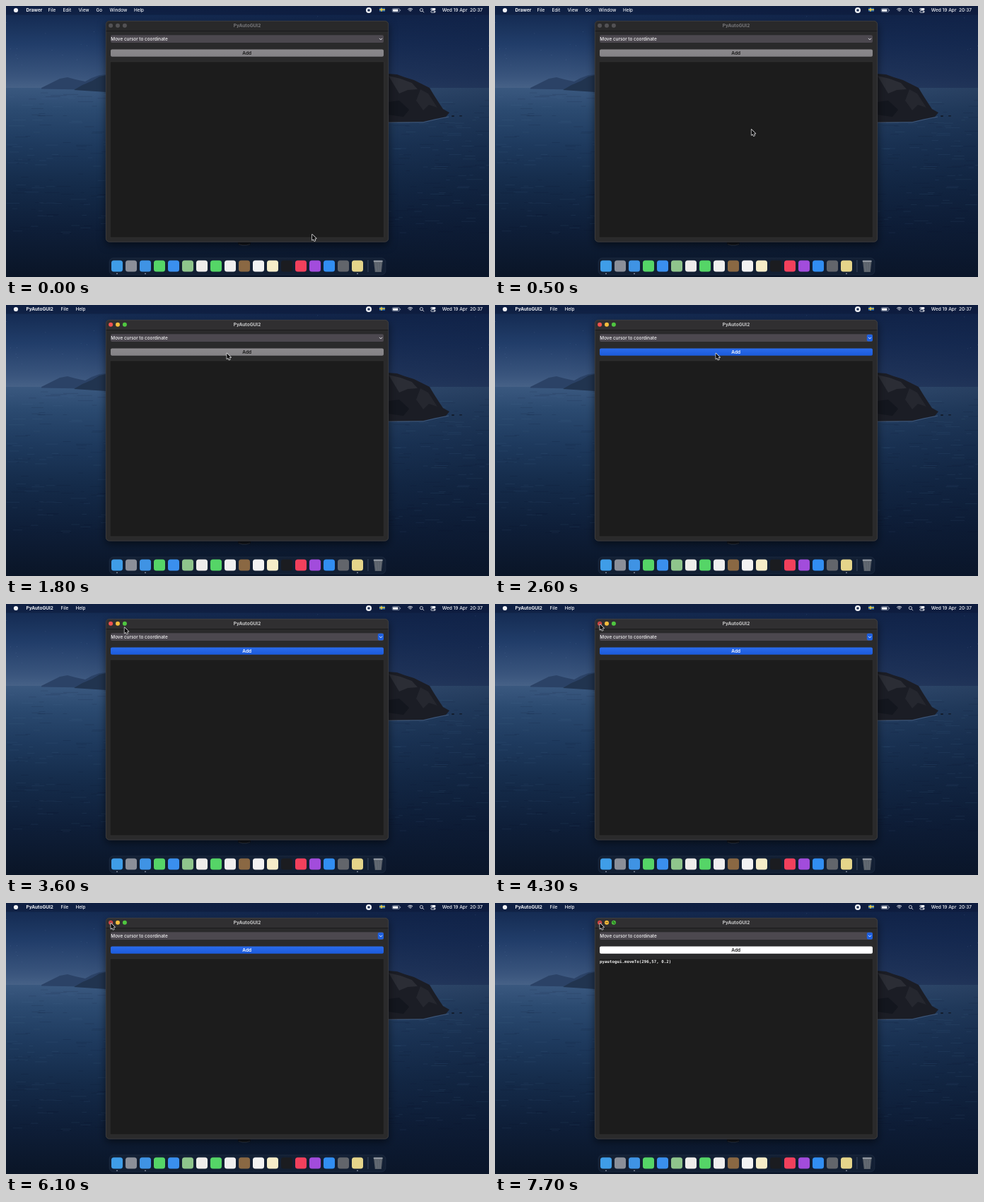
An HTML page with a canvas that plays this animation: 683x384 px, repeating every 8000 ms.

```html
<!DOCTYPE html>
<html lang="en">
<head>
<meta charset="utf-8">
<title>Desktop automation demo</title>
<style>
html, body { margin: 0; width: 100%; height: 100%; overflow: hidden; background: #0a1426; }
canvas { display: block; width: 683px; height: 384px; }
</style>
</head>
<body>
<canvas id="stage"></canvas>
<script>
const W = 683, H = 384, LOOP = 8000, STEP = 100;
const SANS = 'Inter, "Open Sans", sans-serif';
const MONO = '"DejaVu Sans Mono", "Liberation Mono", monospace';
const canvas = document.getElementById('stage');
const scale = window.devicePixelRatio || 1;
canvas.width = Math.round(W * scale);
canvas.height = Math.round(H * scale);
const screen2d = canvas.getContext('2d');
let ctx = screen2d;

function rect(x, y, w, h, fill, r = 0) {
  ctx.fillStyle = fill;
  ctx.beginPath();
  ctx.roundRect(x, y, w, h, r);
  ctx.fill();
}
function disc(x, y, r, fill) {
  ctx.fillStyle = fill;
  ctx.beginPath();
  ctx.arc(x, y, r, 0, Math.PI * 2);
  ctx.fill();
}
function trace(points, closed) {
  ctx.beginPath();
  points.forEach(([x, y]) => ctx.lineTo(x, y));
  if (closed) ctx.closePath();
}
function poly(points, fill) {
  trace(points, true);
  ctx.fillStyle = fill;
  ctx.fill();
}
function line(points, color, width = 0.8) {
  trace(points);
  ctx.strokeStyle = color;
  ctx.lineWidth = width;
  ctx.stroke();
}
function text(str, x, y, color, { size = 6.3, weight = 500, align = 'left', family = SANS } = {}) {
  ctx.font = `${weight} ${size}px ${family}`;
  ctx.textAlign = align;
  ctx.fillStyle = color;
  ctx.fillText(str, x, y);
}
function gradient(x0, y0, x1, y1, ...stops) {
  const g = ctx.createLinearGradient(x0, y0, x1, y1);
  stops.forEach(([at, color]) => g.addColorStop(at, color));
  return g;
}
const vertical = (y0, y1, ...stops) => gradient(0, y0, 0, y1, ...stops);
const horizontal = (x0, x1, ...stops) => gradient(x0, 0, x1, 0, ...stops);

function random(seed) {
  return () => (seed = (seed * 16807) % 2147483647) / 2147483647;
}

function drawWallpaper() {
  const rnd = random(77);
  rect(0, 0, W, 118, vertical(0, 118, [0, '#11264c'], [0.45, '#213d69'], [0.85, '#3a557d'], [1, '#486388']));
  rect(0, 0, W, 118, horizontal(100, W, [0, 'rgba(14,30,66,0)'], [0.75, 'rgba(14,30,66,.62)'], [1, 'rgba(14,30,66,.68)']));
  rect(0, 116, W, H - 116, vertical(116, H,
    [0, '#3a587f'], [0.12, '#2b4a70'], [0.3, '#1e3a5e'], [0.5, '#152c4b'], [0.75, '#0e1e38'], [1, '#0a1527']));
  rect(0, 116, W, H - 116, horizontal(200, W, [0, 'rgba(10,22,46,0)'], [0.8, 'rgba(10,22,46,.28)'], [1, 'rgba(10,22,46,.36)']));
  for (let i = 0; i < 35; i++) rect(rnd() * W, 14 + rnd() * 70, 0.7, 0.7, 'rgba(170,190,225,.28)');
  for (let i = 0; i < 600; i++) {
    const y = 122 + rnd() * 200;
    const tone = rnd() < 0.5 ? '90,125,165' : '5,14,32';
    rect(rnd() * W, y, 5 + rnd() * 18, 0.9, `rgba(${tone},.13)`);
  }
  poly([[50, 116], [64, 109], [76, 103], [87, 101], [98, 104], [112, 107], [121, 102], [132, 98],
    [142, 97], [142, 119], [50, 117.5]], '#2b4266');
  poly([[96, 119], [108, 112], [122, 106], [132, 100], [142, 98], [142, 122]], '#21344f');
  poly([[540, 96], [553, 97], [564, 101], [577, 105], [587, 110], [599, 116], [605, 126], [612, 137],
    [618, 146], [627, 151], [622, 157], [607, 160], [590, 164], [540, 165]], '#1b1d25');
  poly([[541, 99], [558, 103], [574, 109], [582, 118], [568, 119], [556, 124]], '#2b2d35');
  poly([[586, 118], [597, 124], [610, 144], [598, 140], [590, 148], [580, 134]], '#25272f');
  poly([[541, 136], [556, 134], [570, 147], [562, 157], [541, 154]], '#13161e');
  rect(630, 155, 4, 2, '#131c2c', 1);
  rect(641, 155, 4, 1.6, '#131c2c', 0.8);
  line([[541, 165], [590, 164.8], [607, 160.8], [626, 157]], 'rgba(130,150,180,.45)');
}

const DOCK_COLORS = ['#3f9de8', '#8b8f99', '#3f93e4', '#55d567', '#3a8fee', '#8fc58c', '#eeecea',
  '#55d567', '#f0efef', '#8a6843', '#f2f2f2', '#f5ecc8', '#1b1c20', '#f2405c', '#a24cdc',
  '#318ef2', '#62656b', '#e5d58a'];

function drawDock() {
  rect(146, 357, 391, 24, 'rgba(20,33,54,.85)', 6);
  ctx.strokeStyle = 'rgba(120,140,175,.22)';
  ctx.lineWidth = 0.5;
  ctx.stroke();
  DOCK_COLORS.forEach((color, i) => rect(149 + i * 20, 360.5, 16, 16, color, 3.5));
  [157, 197, 497].forEach(x => disc(x, 379.3, 0.8, '#c4cbd8'));
  rect(511.6, 360, 0.7, 17, 'rgba(150,165,190,.45)');
  poly([[520, 362], [532.5, 362], [530.8, 377], [521.8, 377]], '#596069');
  [523, 526.2, 529.4].forEach(x => line([[x, 364], [526.2 + (x - 526.2) * 0.8, 376]], '#767d86', 0.7));
  rect(519.6, 360.5, 13.2, 2.2, '#969ca4', 1.1);
}

function drawStatusIcons() {
  disc(513, 6, 4, '#f2f4f8');
  rect(511.4, 4.4, 3.2, 3.2, '#17294d', 0.6);
  rect(528, 2.8, 8, 5, '#2a67a5');
  rect(530.3, 2.8, 1.4, 5, '#f4cf3e');
  rect(528, 4.6, 8, 1.4, '#f4cf3e');
  ctx.strokeStyle = '#a9b3c6';
  ctx.lineWidth = 0.6;
  ctx.beginPath();
  ctx.roundRect(546.2, 3.6, 10.4, 5, 1.4);
  ctx.stroke();
  rect(547, 4.4, 7.5, 3.4, '#f2f4f8', 0.7);
  rect(557.3, 5.2, 0.8, 1.8, '#a9b3c6');
  ctx.strokeStyle = '#f2f4f8';
  ctx.lineWidth = 1;
  [1.2, 3, 4.8].forEach(r => {
    ctx.beginPath();
    ctx.arc(571.7, 8.2, r, -Math.PI * 0.76, -Math.PI * 0.24);
    ctx.stroke();
  });
  ctx.lineWidth = 0.8;
  ctx.beginPath();
  ctx.arc(587.4, 5.6, 2.1, 0, Math.PI * 2);
  ctx.stroke();
  line([[589, 7.2], [591, 9.2]], '#f2f4f8', 0.9);
  rect(600.5, 3, 7, 2.9, '#f2f4f8', 1.4);
  ctx.strokeStyle = '#f2f4f8';
  ctx.lineWidth = 0.7;
  ctx.beginPath();
  ctx.roundRect(600.8, 6.8, 6.4, 2.5, 1.2);
  ctx.stroke();
  disc(602, 4.45, 0.8, '#17294d');
  disc(606, 8.05, 0.9, '#f2f4f8');
}

function drawMenuBar(active) {
  rect(0, 0, W, 12.5, 'rgba(10,22,50,.4)');
  disc(14, 6, 3.1, '#f2f4f8');
  const items = active
    ? [['PyAutoGUI2', 28.5], ['File', 77.5], ['Help', 98.5]]
    : [['Drawer', 28.5], ['File', 59.5], ['Edit', 80.5], ['View', 102.5], ['Go', 127.5],
      ['Window', 146.5], ['Help', 181]];
  items.forEach(([label, x], i) =>
    text(label, x, 8.4, '#f2f4f8', { size: i ? 6.4 : 6.5, weight: i ? 500 : 700 }));
  drawStatusIcons();
  text('Wed 19 Apr  20:37', 674, 8.4, '#f2f4f8', { size: 6.55, align: 'right' });
}

function drawLights({ active, hoverClose, hoverAll }) {
  const colors = active ? ['#f0524f', '#f5bd3d', '#4fc640'] : Array(3).fill('#525154');
  if (hoverClose) colors[0] = '#dd4a4c';
  colors.forEach((color, i) => disc(148.1 + i * 9.9, 27.7, 3, color));
  const ink = 'rgba(70,15,10,.8)';
  if (hoverClose) {
    line([[146.8, 26.3], [149.6, 29.1]], ink);
    line([[149.6, 26.3], [146.8, 29.1]], ink);
  }
  if (hoverAll) {
    line([[156.3, 27.7], [159.9, 27.7]], 'rgba(85,50,0,.85)');
    poly([[166.5, 26.1], [168.9, 26.1], [166.5, 28.5]], 'rgba(10,70,10,.85)');
    poly([[169.5, 29.3], [167.1, 29.3], [169.5, 26.9]], 'rgba(10,70,10,.85)');
  }
}

function drawAddButton(state) {
  const look = {
    idle: ['#8b898c', '#848286', '#161616'],
    ready: ['#2b6cec', '#1b5ada', '#ffffff'],
    pressed: ['#ffffff', '#ffffff', '#161616']
  }[state];
  rect(148, 61.6, 386, 10.2, vertical(61, 72, [0, look[0]], [1, look[1]]), 2);
  text('Add', 340.7, 68.6, look[2], { align: 'center', size: 6.5, weight: 600 });
}

function drawWindow(state) {
  ctx.save();
  ctx.shadowColor = 'rgba(0,0,0,.55)';
  ctx.shadowBlur = 12 * scale;
  ctx.shadowOffsetY = 4 * scale;
  rect(141, 21, 400, 313.5, '#2a2a2b', 5);
  ctx.restore();
  rect(141, 21, 400, 14.5, state.active ? '#302f31' : '#29292a', [5, 5, 0, 0]);
  rect(141, 35, 400, 0.7, '#161617');
  ctx.strokeStyle = '#48494c';
  ctx.lineWidth = 0.6;
  ctx.beginPath();
  ctx.roundRect(141.3, 21.3, 399.4, 312.9, 5);
  ctx.stroke();
  drawLights(state);
  text('PyAutoGUI2', 341, 29.8, state.active ? '#c9c9ca' : '#77777a',
    { size: 6.5, weight: 700, align: 'center' });

  rect(148, 41.3, 386, 10.7, '#4c484f', 2);
  text('Move cursor to coordinate', 148.3, 48.9, '#f1f0f2', { size: 6.4 });
  if (state.button !== 'idle') rect(525.8, 41.8, 8.2, 9.8, '#1f60de', 2);
  line([[528, 45.8], [530, 47.8], [532, 45.8]], '#f1f1f3', 1);
  drawAddButton(state.button);

  rect(147.3, 79, 387, 249, '#1c1c1c');
  ctx.strokeStyle = '#363637';
  ctx.lineWidth = 0.5;
  ctx.strokeRect(147.3, 79, 387, 249);
  if (state.code) {
    text('pyautogui.moveTo(296,57, 0.2)', 148, 84.8, '#f0f0f0',
      { size: 5.8, weight: 700, family: MONO });
  }
}

function drawCursor({ x, y }) {
  const shape = [[0, 0], [0, 8], [1.9, 6.4], [3.1, 9.2], [4.5, 8.6], [3.3, 5.9], [5.8, 5.8]];
  const points = shape.map(([dx, dy]) => [x + dx, y + dy]);
  trace(points, true);
  ctx.lineJoin = 'round';
  ctx.lineWidth = 1.4;
  ctx.strokeStyle = '#e6e6e8';
  ctx.stroke();
  poly(points, '#0a0a0b');
}

function glide(t, start, length, from, to) {
  const u = Math.min(1, Math.max(0, (t - start) / length));
  const k = u * u * (3 - 2 * u);
  return { x: from.x + (to.x - from.x) * k, y: from.y + (to.y - from.y) * k };
}

const REST = { x: 432.9, y: 323.8 }, ADD = { x: 312.3, y: 68.4 }, CLOSE = { x: 148.3, y: 28.6 };

function cursorAt(t) {
  return t < 2900 ? glide(t, 0, 900, REST, ADD) : glide(t, 2900, 890, ADD, CLOSE);
}

// The parts that never change are painted once.
const backdrop = document.createElement('canvas');
backdrop.width = canvas.width;
backdrop.height = canvas.height;
ctx = backdrop.getContext('2d');
ctx.scale(scale, scale);
drawWallpaper();
drawDock();
rect(328, 333, 18, 6, '#10141c', 3);
line([[329, 337.5], [334, 339], [340, 339], [345, 337.5]], 'rgba(150,160,178,.3)', 0.8);
ctx = screen2d;
ctx.scale(scale, scale);

function render(t) {
  const active = t >= 1600;
  ctx.drawImage(backdrop, 0, 0, W, H);
  drawMenuBar(active);
  drawWindow({
    active,
    hoverClose: t >= 3800,
    hoverAll: t >= 7700,
    code: t >= 7700,
    button: t >= 7700 ? 'pressed' : t >= 2600 ? 'ready' : 'idle'
  });
  drawCursor(cursorAt(t));
}

const began = performance.now();
let shown = -1;
function tick() {
  const t = Math.floor(((performance.now() - began) % LOOP) / STEP) * STEP;
  if (t !== shown) render(shown = t);
  requestAnimationFrame(tick);
}
tick();
</script>
</body>
</html>
```
